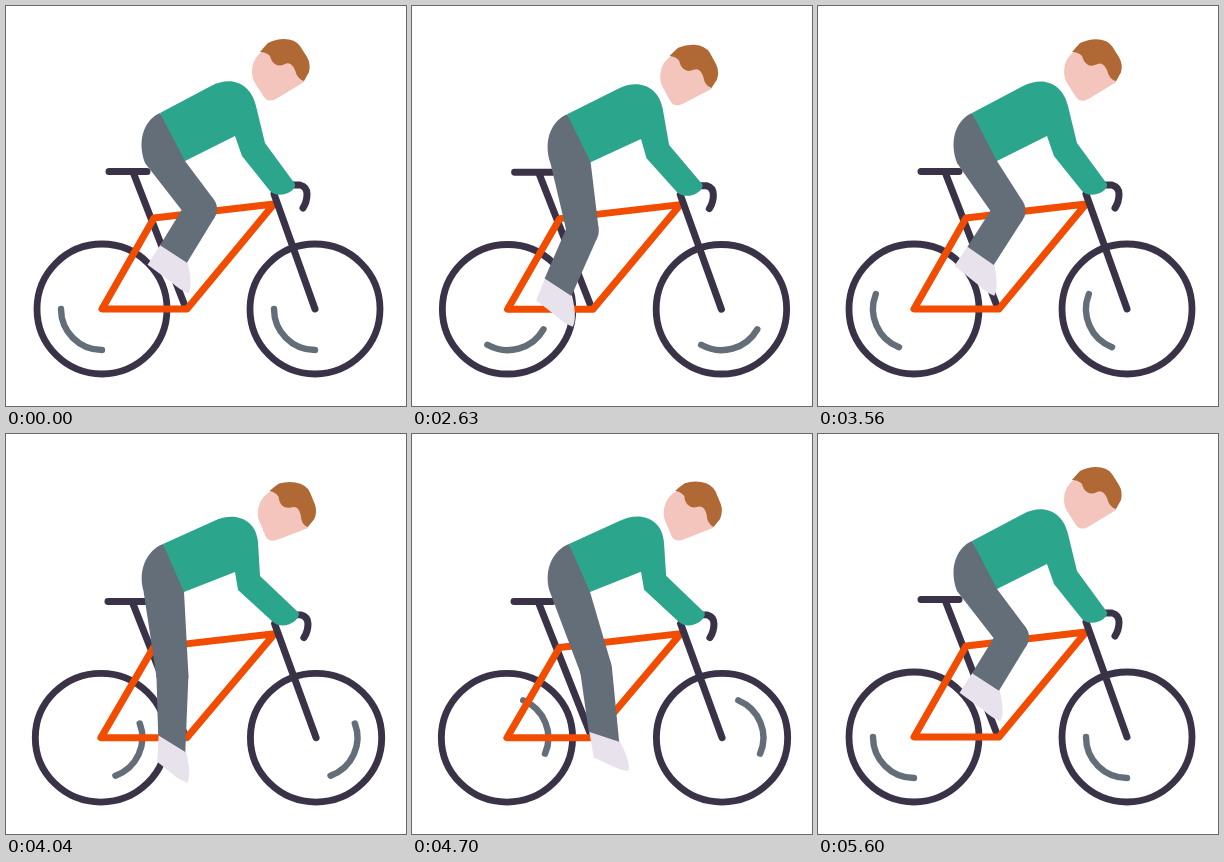
An HTML page with a canvas that plays this animation: 400 by 400 pixels, repeating every 5630 ms.

```html
<!DOCTYPE html>
<html lang="en">
<head>
<meta charset="utf-8">
<title>Cyclist</title>
<style>
html, body { margin: 0; width: 100%; height: 100%; overflow: hidden; background: #fff; }
canvas { display: block; }
</style>
</head>
<body>
<canvas id="stage" width="400" height="400"></canvas>
<script>
const ctx = document.getElementById('stage').getContext('2d');
const LOOP = 5630, HOLD = 2000, STEP = 30;
const HALF = 13.2;          // steps per half pedal stroke
const LAST = 7 * HALF;      // the final half stroke is slower
const END = 120, WHEEL_STOP = 101;
const DARK = '#3a3347', GREY = '#646e78', ORANGE = '#f24c00',
      GREEN = '#2ca58d', SKIN = '#f4c5bd', HAIR = '#b06935', SHOE = '#e8e2ec';

// Torso and arm outline, upright and crouched
const UPRIGHT = [154,107, 205,80, 226,69, 245,78, 250,100, 259,137, 289,178,
                 291,185, 273,194, 264,185, 236,150, 229,130, 179,155];
const CROUCHED = [157,110, 208,87, 229,77, 250,85, 252,108, 254,142, 293,179,
                  294,187, 277,197, 267,188, 232,156, 229,138, 178,158];

const SEAT = new Path2D('M103 165.5H141M127 166L179 300');
const FORK = new Path2D('M268 188L309 303M286 179H294Q301 181 301 188Q301 196 297 202');
const FRAME = new Path2D('M148 212L96 303H181L268 198Z');
const FACE = new Path2D('M258 44Q246 52 246 65Q246 72 249 77L258 91Q262 97 270 93L298 76L296 52Z');
const HAIR_SHAPE = new Path2D('M254 46Q258 41 262 37Q270 33 278 33Q289 33 294 40L301 51' +
  'Q305 58 303 66L298 75Q291 73 289 64Q285 55 279 58Q273 61 269 58Q265 55 264 50Q260 46 254 46Z');

function fill(color, path) {
  ctx.fillStyle = color;
  path ? ctx.fill(path) : ctx.fill();
}

function stroke(color, width, path) {
  ctx.strokeStyle = color;
  ctx.lineWidth = width;
  path ? ctx.stroke(path) : ctx.stroke();
}

function wheel(x, turn) {
  ctx.beginPath();
  ctx.arc(x, 303, 65, 0, 2 * Math.PI);
  stroke(DARK, 6.8);
  ctx.beginPath();
  ctx.arc(x, 303, 41, turn + Math.PI / 2, turn + Math.PI);
  stroke(GREY, 6.4);
}

function bike(crouch, turn) {
  ctx.save();
  ctx.translate(202.5, 371);
  ctx.scale(1 + 0.01 * crouch, 1 - 0.01 * crouch);
  ctx.translate(-202.5, -371);
  wheel(96, turn);
  wheel(309, turn);
  stroke(DARK, 7, SEAT);
  stroke(ORANGE, 7, FRAME);
  stroke(DARK, 7, FORK);
  ctx.restore();
}

// Points at distance r on both sides of b, across the line from a to b
function sides(a, b, r) {
  const d = Math.hypot(b[0] - a[0], b[1] - a[1]);
  const nx = (b[1] - a[1]) / d * r, ny = (a[0] - b[0]) / d * r;
  return [[b[0] - nx, b[1] - ny], [b[0] + nx, b[1] + ny]];
}

function leg(pedal, crouch) {
  const c = Math.cos(pedal), s = Math.sin(pedal);
  const wave = (mid, a, b) => mid + a * c + b * s;
  const dip = 1 - Math.cos(2 * pedal);
  const knee = [wave(184, 11, 17), wave(221.5, -18.5, -6) + 1.5 * dip];
  const ankle = [wave(173, -5.5, 26.5), wave(278.5, -30.5, -6) + 3 * dip];
  const tilt = (wave(30.5, 2.3, -13) - 5.6 * dip) * Math.PI / 180;
  const hip = [157 + crouch, 152 + 3 * crouch];
  const cut = [16 * Math.cos(tilt), 16 * Math.sin(tilt)];

  ctx.save();
  ctx.translate(...ankle);
  ctx.rotate(tilt);
  ctx.beginPath();
  ctx.moveTo(-16, -1);
  ctx.lineTo(wave(-9, -7, 0), 23);
  ctx.lineTo(14, 25);
  ctx.quadraticCurveTo(25, 27, 34, 25);
  ctx.quadraticCurveTo(33, 15, 16, -1);
  fill(SHOE);
  ctx.restore();

  const [back, front] = sides(hip, knee, 16);
  const dx = 1.5 * crouch, dy = 3 * crouch;
  ctx.beginPath();
  ctx.moveTo(154 + 2 * dx, 107 + dy);
  ctx.bezierCurveTo(140 + dx, 113 + dy, 130 + dx, 132 + dy, 139 - dx, 157);
  ctx.lineTo(...back);
  ctx.lineTo(...front);
  ctx.lineTo(179 - crouch, 155 + dy);
  ctx.lineTo(182, 150 + dy);
  fill(GREY);

  const [calf, shin] = sides(ankle, knee, 16);
  ctx.beginPath();
  ctx.moveTo(...calf);
  ctx.lineTo(...shin);
  ctx.lineTo(ankle[0] - cut[0], ankle[1] - cut[1]);
  ctx.lineTo(ankle[0] + cut[0], ankle[1] + cut[1]);
  fill(GREY);
  ctx.beginPath();
  ctx.arc(...knee, 16, 0, 2 * Math.PI);
  fill(GREY);
}

function torso(crouch) {
  const p = UPRIGHT.map((v, i) => v + (CROUCHED[i] - v) * crouch);
  ctx.beginPath();
  ctx.moveTo(p[0], p[1]);
  ctx.lineTo(p[2], p[3]);
  ctx.bezierCurveTo(...p.slice(4, 10));
  ctx.lineTo(p[10], p[11]);
  ctx.lineTo(p[12], p[13]);
  ctx.bezierCurveTo(...p.slice(14, 20));
  for (let i = 20; i < p.length; i += 2) ctx.lineTo(p[i], p[i + 1]);
  fill(GREEN);
}

function head(crouch) {
  ctx.save();
  ctx.translate(275 + 6 * crouch, 64 + 14.5 * crouch);
  ctx.rotate(0.18 * crouch);
  ctx.translate(-275, -64);
  fill(SKIN, FACE);
  fill(HAIR, HAIR_SHAPE);
  ctx.restore();
}

function draw(now) {
  const step = Math.max(0, Math.floor((now % LOOP - HOLD) / STEP));
  const strokes = step < LAST ? step / HALF : 7 + (step - LAST) / (END - LAST);
  const pedal = strokes * Math.PI;
  const crouch = (1 - Math.cos(pedal)) / 1.9;
  const turn = Math.min(step / WHEEL_STOP, 1) * 8 * Math.PI;

  ctx.fillStyle = '#fff';
  ctx.fillRect(0, 0, 400, 400);
  ctx.lineCap = ctx.lineJoin = 'round';
  bike(crouch, turn);
  leg(pedal, crouch);
  torso(crouch);
  head(crouch);
}

const start = performance.now();
function tick() {
  draw(performance.now() - start);
  requestAnimationFrame(tick);
}
tick();
</script>
</body>
</html>
```
